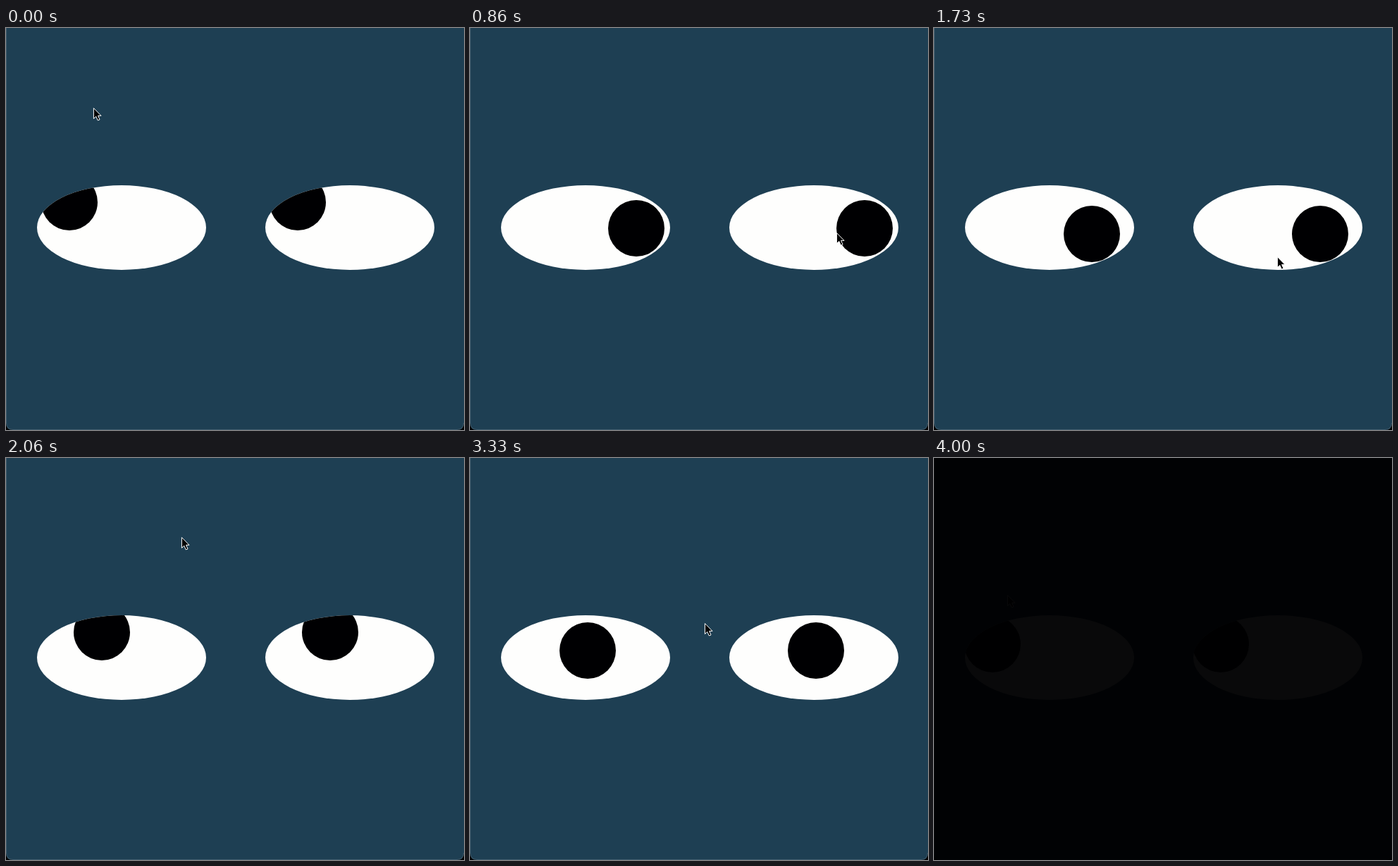
These frames come from a looping animation (650x570 px, 4.2 s). An HTML page:

```html
<!DOCTYPE html>
<html lang="en">
<head>
<meta charset="utf-8">
<title>Watching eyes</title>
<style>
  html, body { margin: 0; width: 100%; height: 100%; overflow: hidden; background: #000; }
  svg { display: block; }
</style>
</head>
<body>
<svg width="650" height="570" viewBox="0 0 650 570">
  <defs>
    <clipPath id="lid"><ellipse cx="120" cy="60" rx="120" ry="60"/></clipPath>
    <g id="eye">
      <ellipse cx="120" cy="60" rx="120" ry="60" fill="#fefefd"/>
      <g clip-path="url(#lid)"><circle id="pupil" r="40" fill="#000002"/></g>
    </g>
  </defs>
  <rect width="650" height="570" fill="#000"/>
  <path d="M0 0H650V560Q650 570 640 570H10Q0 570 0 560Z" fill="#1e3f53"/>
  <path d="M.5 0V560Q.5 569.5 10 569.5H640Q649.5 569.5 649.5 560" fill="none" stroke="#fff" stroke-opacity=".16"/>
  <use href="#eye" x="44" y="223"/>
  <use href="#eye" x="368" y="223"/>
  <path id="cursor" d="M.4 .6V15.6L3.8 12.4L6.3 18L9 16.9L6.6 11.4H11Z"
    fill="#000" stroke="#fff" stroke-linejoin="round"/>
  <rect id="shade" width="650" height="570" fill="#000002" opacity="0"/>
</svg>
<script>
const LOOP = 4200, W = 650, H = 570;
const [pupil, cursor, shade] = ['pupil', 'cursor', 'shade'].map(id => document.getElementById(id));

// Key points of the pointer's sweep: tick, x, y
const keys = [
  [0, 125, 113], [2, 106, 282], [4, 235, 386], [7, 558, 305], [11, 160, 255],
  [13, 521, 290], [16, 590, 270], [20, 267, 164], [22, 2, 360], [25, 250, 547],
  [26, 488, 324], [31, 250, 112], [37, 330, 420], [39, 454, 300], [41, 410, 222],
  [45, 410, 222], [48, 635, 420], [50, 334, 234], [53, 50, 500], [56, 141, 268], [60, 105, 194]
];

const slope = (i, axis) =>
  (keys[i + 1][axis] - keys[i][axis]) / (keys[i + 1][0] - keys[i][0]);

// Tangent at a key; zero where the pointer turns or rests
function tangent(i, axis) {
  if (i === 0 || i === keys.length - 1) return 0;
  const a = slope(i - 1, axis), b = slope(i, axis);
  return a * b > 0 ? 2 * a * b / (a + b) : 0;
}

// Cubic curve through the keys
function pointer(tick, axis) {
  let i = 0;
  while (i < keys.length - 2 && keys[i + 1][0] <= tick) i++;
  const span = keys[i + 1][0] - keys[i][0];
  const u = Math.min(1, (tick - keys[i][0]) / span), v = 1 - u;
  return keys[i][axis] * v * v * (1 + 2 * u) + keys[i + 1][axis] * u * u * (1 + 2 * v)
    + span * u * v * (v * tangent(i, axis) - u * tangent(i + 1, axis));
}

// Ticks run at 15 per second on a 10 ms clock
const tickAt = t => Math.floor((Math.floor(t / 10) * 3 + 2) / 20);

// Early on, every third tick repeats the one before
const captured = tick => tick > 0 && tick < 42 && tick % 3 === 0 ? tick - 1 : tick;

function draw(t) {
  const tick = tickAt(t);
  const [x, y] = [1, 2].map(axis => Math.round(pointer(captured(tick), axis)));
  pupil.setAttribute('cx', Math.round(x / W * 240));
  pupil.setAttribute('cy', Math.round((y + 2) / H * 120));
  cursor.setAttribute('transform', `translate(${x - 1} ${y})`);
  const light = 0.537 - (Math.min(tick, 60) - 56) * 0.1255;
  shade.setAttribute('opacity', Math.max(0, 1 - light));
}

const start = performance.now();
function loop() {
  draw((performance.now() - start) % LOOP);
  requestAnimationFrame(loop);
}
draw(0);
requestAnimationFrame(loop);
</script>
</body>
</html>
```
